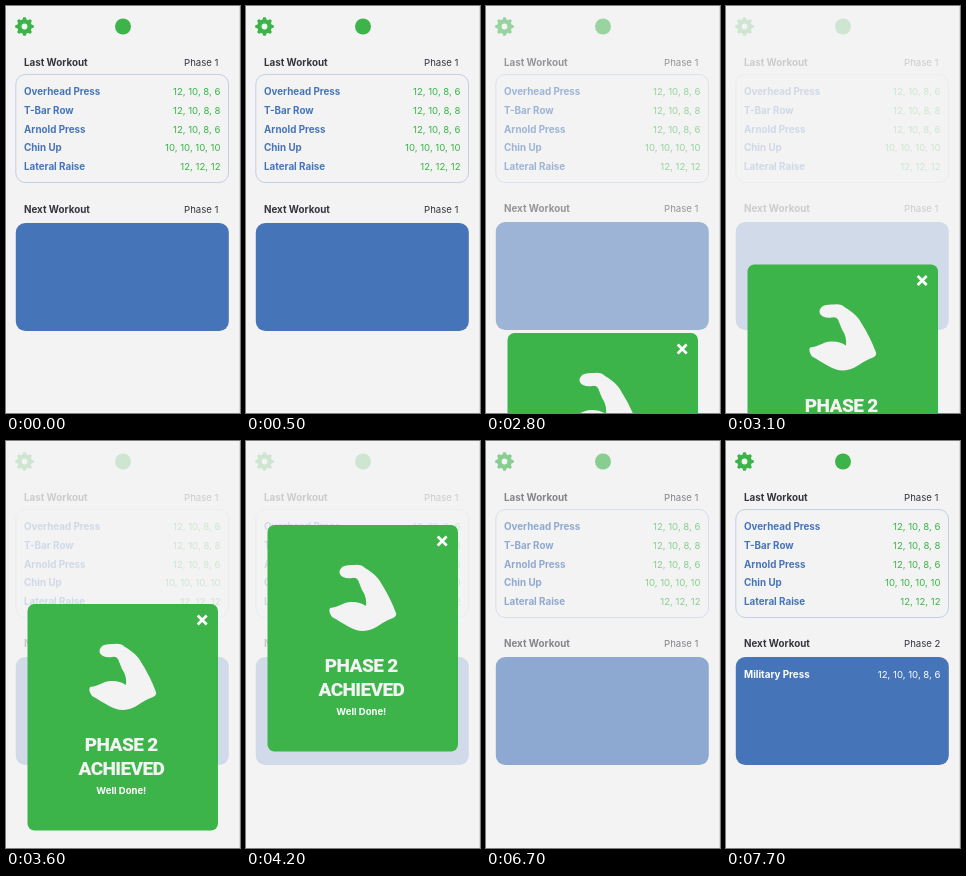
An HTML page with a canvas for the animation above (8000 ms loop, 234 by 407 pixels).

```html
<!DOCTYPE html>
<html lang="en">
<head>
<meta charset="utf-8">
<title>Workout phases</title>
<style>
  html, body { margin: 0; width: 100%; height: 100%; overflow: hidden; background: #f3f3f3; }
  canvas { display: block; width: 234px; height: 407px; }
</style>
</head>
<body>
<canvas id="stage"></canvas>
<script>
const W = 234, H = 407, LOOP = 8000, STEP = 100;
const BG = '#f3f3f3', BLUE = '#4674b8', GREEN = '#3cb44a', INK = '#34343e';
const BOLD = '700 9.8px Inter, sans-serif';
const REGULAR = '400 9.6px Inter, sans-serif';
const LEFT = 18, RIGHT = 214.5;

const canvas = document.getElementById('stage');
const ctx = canvas.getContext('2d');
const ratio = window.devicePixelRatio || 1;
canvas.width = W * ratio;
canvas.height = H * ratio;
ctx.scale(ratio, ratio);

const lastWorkout = [
  ['Overhead Press', '12, 10, 8, 6'],
  ['T-Bar Row', '12, 10, 8, 8'],
  ['Arnold Press', '12, 10, 8, 6'],
  ['Chin Up', '10, 10, 10, 10'],
  ['Lateral Raise', '12, 12, 12']
];

// [time, value] pairs, linear in between
const fadeKeys = [[2400, 1], [2500, 0.79], [3100, 0.2], [6300, 0.2],
                  [6700, 0.58], [6800, 0.58], [7200, 1]];
const cardKeys = [[2500, 395.5], [3100, 258.5], [3600, 163], [3700, 163],
                  [3900, 126], [4000, 126], [4200, 84]];

function track(keys, t) {
  if (t <= keys[0][0]) return keys[0][1];
  for (let i = 1; i < keys.length; i++) {
    const [t0, v0] = keys[i - 1], [t1, v1] = keys[i];
    if (t <= t1) return v0 + (v1 - v0) * (t - t0) / (t1 - t0);
  }
  return keys[keys.length - 1][1];
}

function text(str, x, y, font, color, align = 'left', spacing = 0) {
  ctx.font = font;
  ctx.fillStyle = color;
  ctx.textAlign = align;
  ctx.letterSpacing = spacing + 'px';
  ctx.fillText(str, x, y);
}

function title(name, phase, y) {
  text(name, LEFT, y, BOLD, INK);
  text(phase, 178, y, REGULAR, INK);
}

function row(name, reps, y, nameColor, repsColor) {
  text(name, LEFT, y, BOLD, nameColor);
  text(reps, RIGHT, y, REGULAR, repsColor, 'right');
}

function box(x, y, w, h, r) {
  ctx.beginPath();
  ctx.roundRect(x, y, w, h, r);
}

function makeGear(cx, cy) {
  const path = new Path2D();
  for (let i = 0; i < 160; i++) {
    const a = i / 160 * Math.PI * 2;
    const r = 8.3 + 1.1 * Math.tanh(2 * Math.cos(8 * a));
    path.lineTo(cx + r * Math.cos(a), cy + r * Math.sin(a));
  }
  path.closePath();
  path.moveTo(cx + 2.9, cy);
  path.arc(cx, cy, 2.9, 0, Math.PI * 2, true);
  return path;
}

const gear = makeGear(18.5, 20.5);

// Flexed arm, relative to the card's top edge
const arm = new Path2D(`M93.5 47 Q93.5 44 97 41.5 Q100 39.5 108 40 Q115 39 119 43
  C126 47 132 52 135 58 Q144 72 150 88 Q151 91 147 93
  C135 97 129 106 117 106 C107 106 97 98 86 92 Q82 86 84 83
  C94 82 98 76 107 77 Q114 77 120 81 Q121 72 116 65
  L112 55 Q110 52 106 53 Q101 54 97 52 Q93.5 50 93.5 47 Z`);

function drawHome(t) {
  const shift = t >= 2600 ? -1 : 0;
  const phase = t >= 6900 ? 'Phase 2' : 'Phase 1';
  ctx.globalAlpha = track(fadeKeys, t);

  ctx.fillStyle = GREEN;
  ctx.fill(gear);
  ctx.beginPath();
  ctx.arc(117, 20.5, 8, 0, Math.PI * 2);
  ctx.fill();

  title('Last Workout', 'Phase 1', 60.3);
  box(9.8, 68.5, 212.7, 108, 9.5);
  ctx.strokeStyle = '#c2cfe5';
  ctx.lineWidth = 1;
  ctx.stroke();
  lastWorkout.forEach(([name, reps], i) => row(name, reps, 89.3 + i * 18.65, BLUE, GREEN));

  title('Next Workout', phase, 207.3 + shift);
  box(9.8, 217 + shift, 213, 108, 9.5);
  ctx.fillStyle = BLUE;
  ctx.fill();
  if (t >= 7700) row('Military Press', '12, 10, 10, 8, 6', 237.3, '#fff', '#fff');

  ctx.globalAlpha = 1;
}

function drawCard(t) {
  ctx.save();
  ctx.translate(0, track(cardKeys, t));
  box(21.5, 0, 190.5, 226.5, 7);
  ctx.fillStyle = GREEN;
  ctx.fill();

  ctx.fillStyle = BG;
  ctx.fill(arm);

  // Close button dims once pressed
  ctx.globalAlpha = t >= 5700 ? 0.6 : 1;
  ctx.strokeStyle = '#fff';
  ctx.lineWidth = 2.7;
  ctx.beginPath();
  ctx.moveTo(191.7, 11.5);
  ctx.lineTo(200.7, 20.5);
  ctx.moveTo(200.7, 11.5);
  ctx.lineTo(191.7, 20.5);
  ctx.stroke();
  ctx.globalAlpha = 1;

  const heading = '900 19px Roboto, sans-serif';
  text('PHASE 2', 115.3, 147, heading, BG, 'center', -0.6);
  text('ACHIEVED', 115.3, 171, heading, BG, 'center', -0.6);
  text('Well Done!', 115.3, 190.3, '700 9.5px Inter, sans-serif', '#fff', 'center');
  ctx.restore();
}

function frame() {
  const t = Math.floor(performance.now() % LOOP / STEP) * STEP;
  ctx.fillStyle = BG;
  ctx.fillRect(0, 0, W, H);
  ctx.fillStyle = '#dcdcdc';
  ctx.fillRect(233, 0, 1, H);
  drawHome(t);
  if (t >= 2500 && t < 6200) drawCard(t);
  requestAnimationFrame(frame);
}

frame();
</script>
</body>
</html>
```
